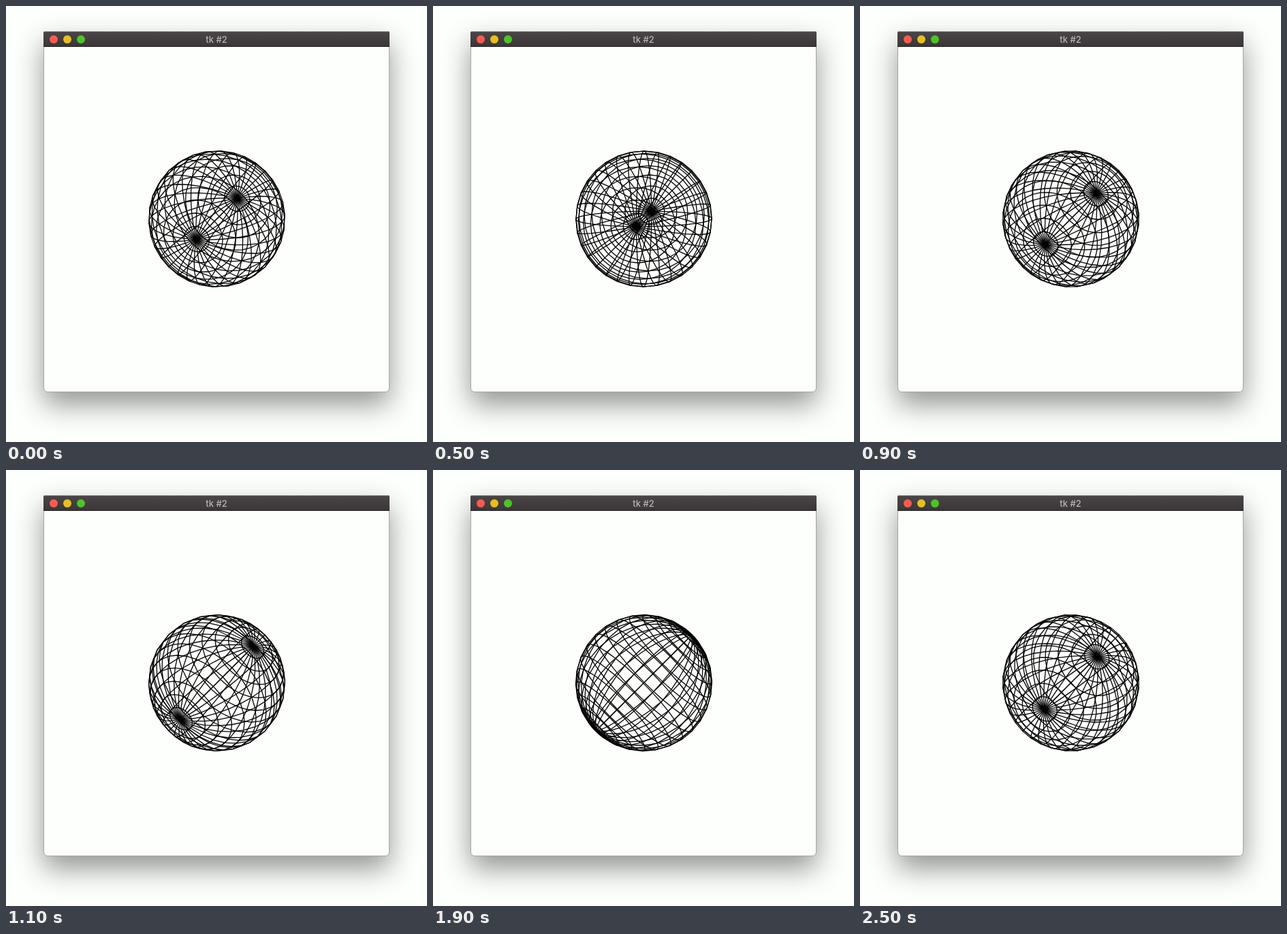
An HTML page with a canvas for the animation above (2.6 s loop, 618x640 px).

```html
<!DOCTYPE html>
<html lang="en">
<head>
<meta charset="utf-8">
<title>Rotating wireframe sphere</title>
<style>
  html, body { margin: 0; width: 100%; height: 100%; overflow: hidden; background: #fdfffc; }
  .window {
    box-sizing: border-box; position: absolute; left: 55px; top: 37px; width: 508px; height: 530px;
    background: #fdfffc; border: 1px solid #a3a4a2; border-radius: 2px 2px 6px 6px;
    box-shadow: 0 18px 40px rgba(0, 0, 0, .42);
  }
  .bar {
    box-sizing: border-box; height: 23px; margin: -1px -1px 0; border-radius: 2px 2px 0 0;
    border-top: 1px solid #8c898a; border-bottom: 1px solid #1d1a1b;
    background: linear-gradient(#4a4546, #3b3738);
    color: #b9b5b5; font: 500 13px/22px Inter, "Open Sans", sans-serif; text-align: center;
  }
  .bar i { position: absolute; top: 5px; width: 12px; height: 12px; border-radius: 50%; }
  canvas { position: absolute; left: 208px; top: 211px; }
</style>
</head>
<body>
<div class="window">
  <div class="bar">
    <i style="left:8px;background:#ff5a50"></i>
    <i style="left:28px;background:#e6bf24"></i>
    <i style="left:48px;background:#50c228"></i>
    tk #2
  </div>
</div>
<canvas width="203" height="203"></canvas>
<script>
const R = 100, SIZE = 203, N = 32;
const FRAME = 100, FRAMES = 26;
const ctx = document.querySelector('canvas').getContext('2d');
ctx.lineWidth = 1.3;
ctx.lineJoin = 'round';

// Sphere vertex turned by angle t about the screen diagonal (1, 1, 0)
function project(lat, lon, t) {
  const theta = lat * 2 * Math.PI / N, phi = lon * 2 * Math.PI / N;
  const x = Math.sin(theta) * Math.cos(phi);
  const y = Math.sin(theta) * Math.sin(phi);
  const z = Math.cos(theta);
  const u = (x + y) / 2;
  const v = (x - y) / 2 * Math.cos(t) + z * Math.SQRT1_2 * Math.sin(t);
  return [SIZE / 2 + R * (u + v), SIZE / 2 + R * (u - v)];
}

function polyline(count, point) {
  ctx.beginPath();
  for (let i = 0; i <= count; i++) ctx.lineTo(...point(i));
  ctx.stroke();
}

function drawSphere(t) {
  ctx.clearRect(0, 0, SIZE, SIZE);
  for (let lon = 0; lon < N; lon++) polyline(N / 2, lat => project(lat, lon, t));
  for (let lat = 1; lat < N / 2; lat++) polyline(N, lon => project(lat, lon, t));
}

let shown = -1;
function tick() {
  const frame = Math.floor(performance.now() / FRAME) % FRAMES;
  if (frame !== shown) {
    shown = frame;
    // Turns in 0.1 rad steps, slightly gaining speed
    const steps = Math.floor(0.8 + 1.04 * frame + 0.0067 * frame ** 2);
    drawSphere((27 + steps) / 10);
  }
  requestAnimationFrame(tick);
}
tick();
</script>
</body>
</html>
```
